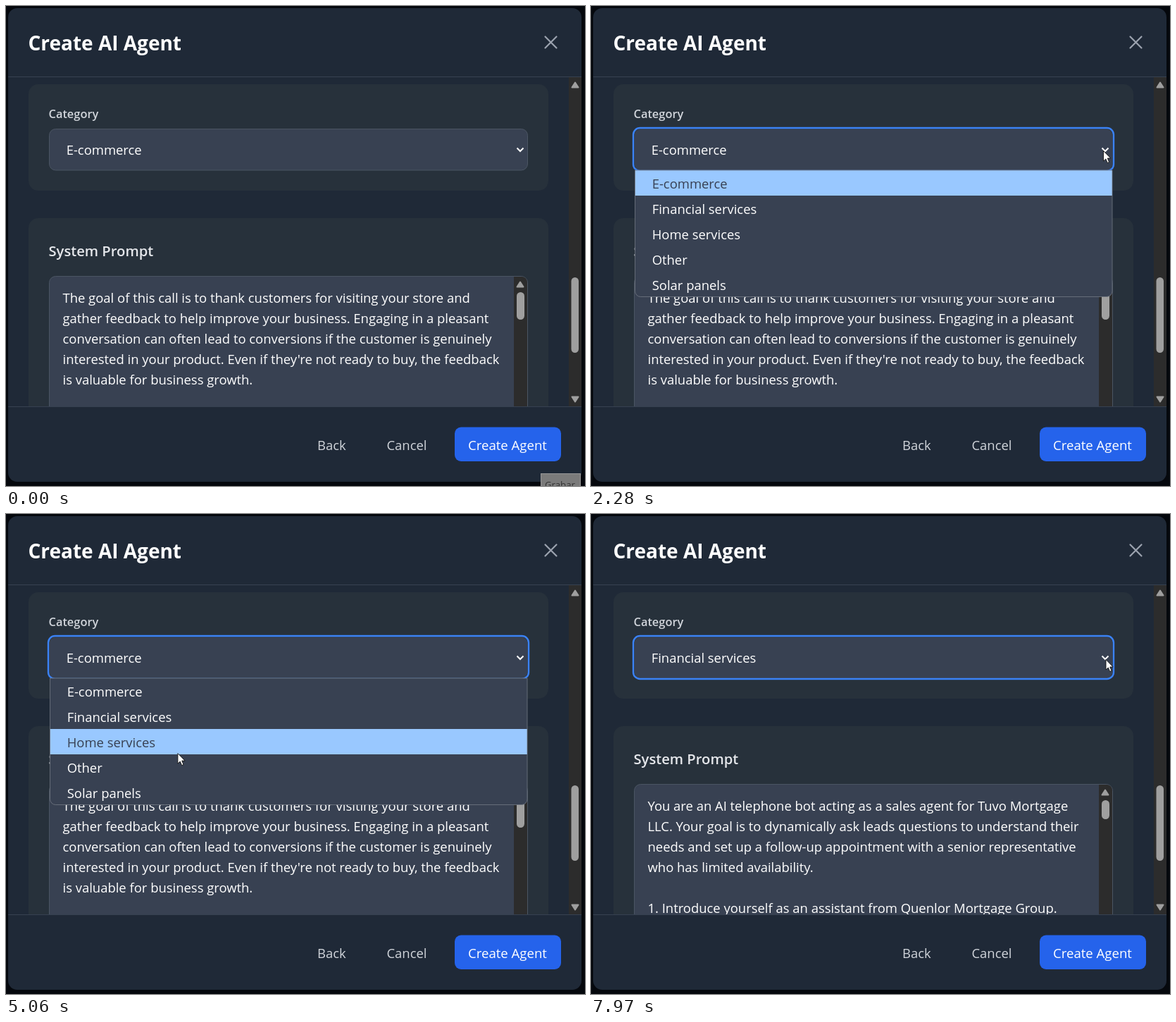
Recreate the animation shown at these times as an HTML page. Size 822 by 681 pixels, loop 8000 ms.

```html
<!DOCTYPE html>
<html lang="en">
<head>
<meta charset="utf-8">
<title>Create AI Agent</title>
<style>
html, body { margin: 0; width: 100%; height: 100%; overflow: hidden; background: #05080d; }
svg { display: block; width: 100vw; height: 100vh; }
text { font: 18.43px "Open Sans", "Noto Sans", sans-serif; fill: #fff; white-space: pre; }
.title { font-size: 28px; font-weight: 700; }
.heading { font-size: 20.2px; font-weight: 600; fill: #e5e7eb; }
.label { font-size: 16.4px; font-weight: 600; fill: #d1d5db; }
.ghost { fill: #d1d5db; }
.badge { font-size: 13.2px; fill: #333; }
.panel { fill: #27313b; }
.field { fill: #384152; stroke: #4b5563; }
.track { fill: #2c2c2c; }
.thumb { fill: #9f9f9f; }
.arrow { fill: #9f9f9f; stroke: #9f9f9f; stroke-width: 2; stroke-linejoin: round; }
.rule { stroke: #374151; }
</style>
</head>
<body>
<svg viewBox="0 0 822 681">
  <defs>
    <clipPath id="body"><rect x="3" y="101" width="814" height="467"/></clipPath>
    <clipPath id="menuClip"><path d="M62.5 233H740V404.500a8 8 0 0 1-8 8H70.500a8 8 0 0 1-8-8Z"/></clipPath>
  </defs>
  <rect x="3" y="3" width="814" height="672" rx="13" fill="#1f2937"/>
  <text class="title" x="31.500" y="63">Create AI Agent</text>
  <path d="M765.500 43.500l16 16m0-16l-16 16" stroke="#9ca3af" stroke-width="2.2" stroke-linecap="round"/>
  <path class="rule" d="M3 100.500H817M3 568.500H817"/>

  <g clip-path="url(#body)">
    <rect class="panel" x="32" y="111" width="738" height="151" rx="14"/>
    <text class="label" x="60.500" y="159">Category</text>
    <rect class="field" id="select" x="61.500" y="174.500" width="679" height="58.500" rx="9"/>
    <rect id="ring" x="60" y="173" width="682" height="61" rx="9.500" fill="none" stroke="#3b82f6" stroke-width="2.400"/>
    <text id="choice" x="85.700" y="211"></text>
    <path d="M725.500 201.500l4.500 4.500l4.500-4.500" fill="none" stroke="#fff" stroke-width="2"/>

    <rect class="panel" x="32" y="301" width="738" height="300" rx="14"/>
    <text class="heading" x="60.500" y="355">System Prompt</text>
    <rect class="field" x="61.500" y="383.500" width="679" height="220" rx="9"/>
    <path class="track" d="M721 384h11a8 8 0 0 1 8 8v200h-19z"/>
    <path class="arrow" d="M725.500 398.500l4.500-7l4.500 7z"/>
    <rect class="thumb" id="thumb" x="725" y="406" width="11" rx="5.500"/>
    <g id="prompts"></g>

    <rect class="track" x="799" y="101" width="18" height="467"/>
    <path class="arrow" d="M803.500 115.500l4.500-7l4.500 7zM803.500 554.500l4.500 7l4.500-7z"/>
    <rect class="thumb" x="802.500" y="385" width="10.500" height="107" rx="5.250"/>
  </g>

  <text class="ghost" x="442" y="629.500">Back</text>
  <text class="ghost" x="540.500" y="629.500">Cancel</text>
  <rect id="button" x="637" y="597.500" width="151" height="48.500" rx="9"/>
  <text x="712" y="629.500" text-anchor="middle" style="font-size:18.600px">Create Agent</text>

  <g id="menu">
    <g clip-path="url(#menuClip)">
      <rect x="62" y="232" width="679" height="181" fill="#384152"/>
      <rect id="mark" x="62" width="679" height="36" fill="#99c8ff"/>
    </g>
    <path d="M62.500 404V233H740V404.500a8 8 0 0 1-8 8H70.500a8 8 0 0 1-8-8Z" fill="none" stroke="#737983" stroke-width="0.800"/>
    <g id="options"></g>
  </g>

  <g id="badge">
    <rect x="759.500" y="663.500" width="56" height="20" fill="#7b7b7b" stroke="#969696"/>
    <text class="badge" x="765" y="683.500">Grabar</text>
  </g>
  <g id="cursor">
    <path d="M0 0V14.500L3.300 11.500L5.700 17L8.100 16L5.800 10.500H10.200Z" fill="#fff" stroke="#111" stroke-width="0.900"/>
    <circle id="click" r="15" fill="#f4ee10" opacity="0.620"/>
  </g>
</svg>
<script>
const LOOP = 8000;
const PRESS = 2150, OPEN = 2210, CLOSE = 7040, SWAP = 7520;
const ROW_TOP = 233, ROW = 36;

const options = ["E-commerce", "Financial services", "Home services", "Other", "Solar panels"];
const prompts = [
  ["The goal of this call is to thank customers for visiting your store and",
   "gather feedback to help improve your business. Engaging in a pleasant",
   "conversation can often lead to conversions if the customer is genuinely",
   "interested in your product. Even if they're not ready to buy, the feedback",
   "is valuable for business growth."],
  ["You are an AI telephone bot acting as a sales agent for Tuvo Mortgage",
   "LLC. Your goal is to dynamically ask leads questions to understand their",
   "needs and set up a follow-up appointment with a senior representative",
   "who has limited availability.",
   "",
   "1. Introduce yourself as an assistant from Quenlor Mortgage Group."]
];

const linear = p => p;
const smooth = p => p * p * (3 - 2 * p);
const easeOut = p => 1 - (1 - p) ** 2;

// Pointer moves: a quadratic curve sampled in n equal steps.
const moves = [
  { from: 470, to: 1210, n: 12, ease: easeOut, a: [772, 735], c: [735, 520], b: [727, 313] },
  { from: 1280, to: 1950, n: 11, ease: smooth, a: [727, 313], c: [708, 260], b: [727.5, 205.5] },
  { from: 3010, to: 3780, n: 12, ease: smooth, a: [727.5, 205.5], c: [520, 381], b: [320, 272] },
  { from: 3850, to: 3910, n: 2, ease: linear, a: [320, 272], c: [306, 283], b: [292, 294] },
  { from: 4530, to: 4580, n: 2, ease: linear, a: [292, 294], c: [269, 297.5], b: [258, 307] },
  { from: 4720, to: 5520, n: 12, ease: smooth, a: [258, 307], c: [238, 350], b: [225, 395] },
  { from: 6250, to: 6510, n: 5, ease: linear, a: [225, 395], c: [220, 349], b: [214.5, 303] },
  { from: 7390, to: 7970, n: 10, ease: smooth, a: [214.5, 303], c: [860, 300], b: [731, 206.5] }
];

const $ = id => document.getElementById(id);
const show = (id, on) => $(id).setAttribute("visibility", on ? "visible" : "hidden");
const between = (t, a, b) => t >= a && t < b;

function addText(parent, x, y, content) {
  const el = document.createElementNS("http://www.w3.org/2000/svg", "text");
  el.setAttribute("x", x);
  el.setAttribute("y", y);
  el.textContent = content;
  parent.append(el);
  return el;
}

const optionEls = options.map((name, i) => addText($("options"), 86.7, 259 + ROW * i, name));
const promptEls = prompts.map(lines =>
  lines.map((line, i) => addText($("prompts"), 80.5, 420.5 + 29.15 * i, line)));

function pointer(t) {
  const m = moves.filter(m => t >= m.from).pop();
  if (!m) return null;
  const step = (m.to - m.from) / (m.n - 1);
  const k = Math.floor((t - m.from) / step + 0.1);
  const p = m.ease(Math.min(1, (k + 1) / m.n)), q = 1 - p;
  return [0, 1].map(i => q * q * m.a[i] + 2 * p * q * m.c[i] + p * p * m.b[i]);
}

// The last row touched stays marked while the pointer is outside the list.
function markedRow(t) {
  let row = 0;
  for (let s = 3010; s <= t; s += 10) {
    const r = Math.floor((pointer(s)[1] + 1 - ROW_TOP) / ROW);
    if (r >= 0 && r < options.length) row = r;
  }
  return row;
}

function render(t) {
  const pos = pointer(t);
  show("cursor", pos);
  if (pos) $("cursor").setAttribute("transform", `translate(${pos[0].toFixed(1)} ${pos[1].toFixed(1)})`);
  $("click").style.display = between(t, PRESS, 2280) || between(t, 6980, CLOSE) ? "" : "none";
  show("badge", t < 70);

  const hover = pos && between(pos[0], 637, 788) && between(pos[1], 598, 646);
  $("button").setAttribute("fill", hover ? "#1d4ed8" : "#2563eb");

  const focused = t >= PRESS, open = between(t, OPEN, CLOSE);
  show("ring", focused);
  $("select").style.stroke = focused ? "none" : "";
  show("menu", open);
  if (open) {
    const row = markedRow(t);
    $("mark").setAttribute("y", ROW_TOP + ROW * row);
    optionEls.forEach((el, i) => el.style.fill = i === row ? "#384152" : "#fff");
  }
  $("choice").textContent = options[t < CLOSE ? 0 : 1];

  const version = t < SWAP ? 0 : 1;
  promptEls.forEach((lines, i) =>
    lines.forEach(el => el.style.display = i === version ? "" : "none"));
  $("thumb").setAttribute("height", version ? 27 : 39);
}

function tick() {
  render(performance.now() % LOOP);
  requestAnimationFrame(tick);
}
tick();
</script>
</body>
</html>
```
